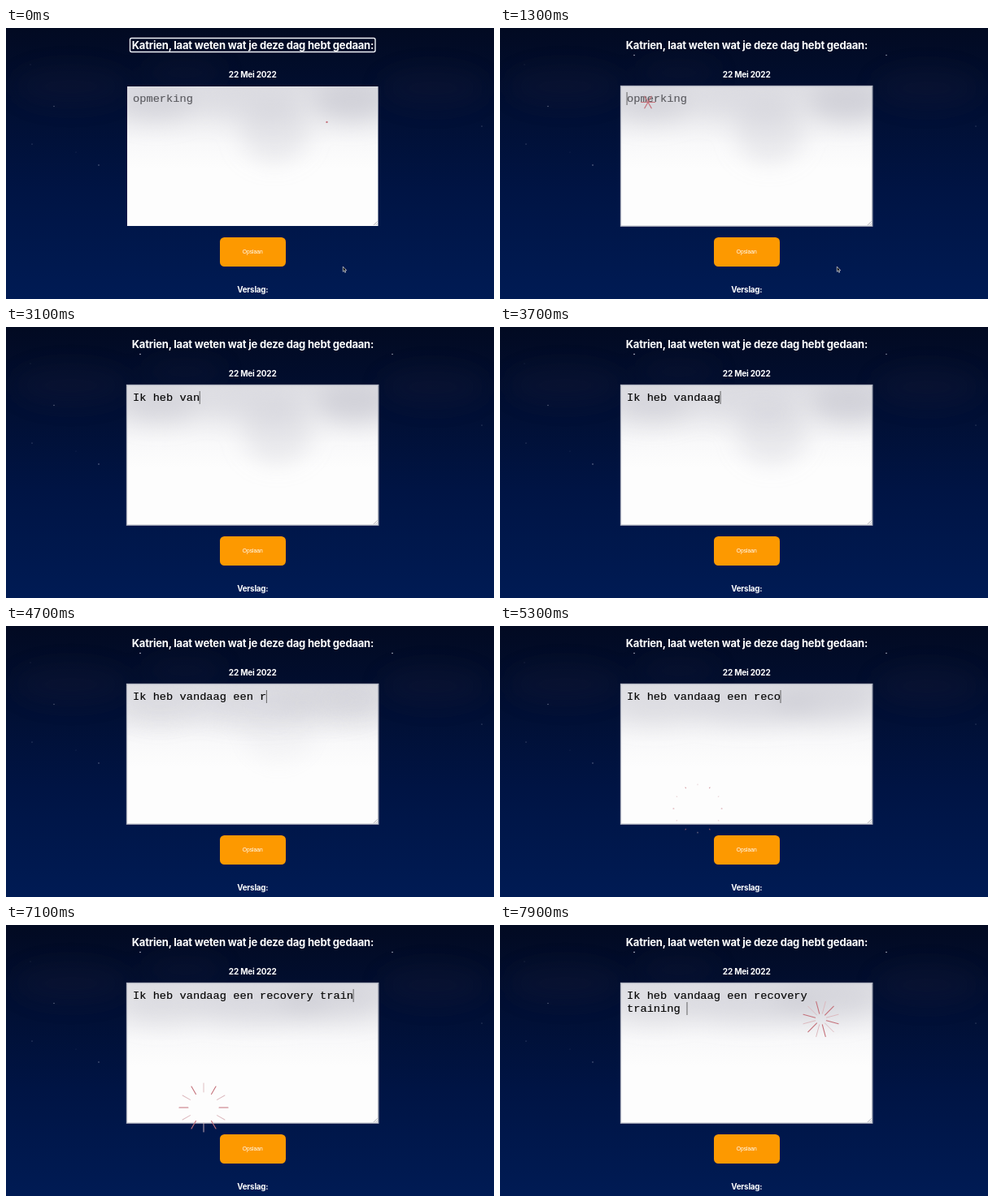
An HTML page that plays this animation: 600 by 334 pixels, repeating every 8000 ms.

```html
<!DOCTYPE html>
<html lang="nl">
<head>
<meta charset="utf-8">
<title>Dagverslag</title>
<style>
  html, body { margin: 0; width: 100%; height: 100%; overflow: hidden; background: #01103a; }
  svg { display: block; width: 100vw; height: 100vh; }
  .ui { font-family: Inter, "Open Sans", sans-serif; font-weight: 700; fill: #fff; text-anchor: middle; letter-spacing: -.2px; }
  .mono { font: 13.69px "Liberation Mono", "Courier New", monospace; white-space: pre; }
  .btn { font: 6.7px "Liberation Sans", Arial, sans-serif; fill: #fff; text-anchor: middle; }
</style>
</head>
<body>
<svg viewBox="0 0 600 334" preserveAspectRatio="none">
  <defs>
    <linearGradient id="night" x2="0" y2="1">
      <stop offset="0" stop-color="#020a22"/>
      <stop offset=".3" stop-color="#010f33"/>
      <stop offset=".6" stop-color="#001444"/>
      <stop offset="1" stop-color="#001b54"/>
    </linearGradient>
    <linearGradient id="paper" x2="0" y2="1">
      <stop offset="0" stop-color="#dfdfe4"/>
      <stop offset=".2" stop-color="#ebebee"/>
      <stop offset=".42" stop-color="#f9f9fa"/>
      <stop offset=".6" stop-color="#fdfdfd"/>
    </linearGradient>
    <filter id="soft" x="-50%" y="-80%" width="200%" height="260%"><feGaussianBlur stdDeviation="14"/></filter>
    <clipPath id="box"><rect x="149" y="72" width="308.5" height="172"/></clipPath>
  </defs>

  <rect width="600" height="334" fill="url(#night)"/>
  <g fill="#20243c" opacity=".2" filter="url(#soft)">
    <ellipse cx="80" cy="72" rx="70" ry="24"/>
    <ellipse cx="525" cy="74" rx="65" ry="24"/>
    <ellipse cx="220" cy="55" rx="50" ry="14"/>
  </g>
  <g id="stars" fill="#e4e8f6"></g>

  <text class="ui" x="303.4" y="26" font-size="13" letter-spacing="-.25">Katrien, laat weten wat je deze dag hebt gedaan:</text>
  <rect id="ring" x="152.5" y="12.5" width="301.5" height="17" rx="2" fill="none" stroke="#eef0f6" stroke-width="1.4"/>
  <text class="ui" x="303.2" y="61" font-size="10">22 Mei 2022</text>

  <rect x="149" y="72" width="308.5" height="172" fill="url(#paper)"/>
  <g clip-path="url(#box)">
    <g id="cloudA" fill="#c6c6cf" filter="url(#soft)">
      <ellipse cx="330" cy="128" rx="42" ry="38" opacity=".34"/>
      <ellipse cx="300" cy="92" rx="70" ry="20" opacity=".3"/>
      <ellipse cx="425" cy="90" rx="48" ry="24" opacity=".65"/>
      <ellipse cx="185" cy="92" rx="50" ry="22" opacity=".55"/>
    </g>
    <g id="cloudB" fill="#c6c6cf" filter="url(#soft)">
      <ellipse cx="400" cy="92" rx="65" ry="24" opacity=".45"/>
      <ellipse cx="310" cy="98" rx="85" ry="22" opacity=".42"/>
      <ellipse cx="190" cy="100" rx="50" ry="20" opacity=".35"/>
    </g>
  </g>
  <path d="M452 243l4.5-4.5M454.5 243l2-2" stroke="#85858e" stroke-width=".6"/>
  <rect id="focus" x="148.5" y="71.5" width="309.3" height="172.7" fill="none" stroke="#b0b3bf" stroke-width="1.3"/>

  <text id="line1" class="mono" x="156" y="91.4" stroke-width=".15"></text>
  <text id="line2" class="mono" x="156" y="107.4" stroke-width=".15"></text>
  <rect id="caret" width=".9" height="16" fill="#555"/>

  <rect x="263" y="258" width="81" height="36" rx="5.5" fill="#fd9900"/>
  <text class="btn" x="303.2" y="278.2">Opslaan</text>
  <text class="ui" x="303.3" y="326" font-size="9.8">Verslag:</text>

  <g id="bursts" stroke-linecap="round"></g>
  <path id="mouse" d="M414.3 294v6.3l1.4-1.3 1 2.4 1-.4-1-2.3h2z" fill="#111" stroke="#fff" stroke-width=".6"/>
</svg>
<script>
const LOOP = 8000, CHAR = 8.215, BURST = 600, REACH = 30;
const NS = 'http://www.w3.org/2000/svg';
const $ = id => document.getElementById(id);
const clamp = (v, a = 0, b = 1) => Math.min(b, Math.max(a, v));
const show = (id, on) => { $(id).style.display = on ? '' : 'none'; };

function add(parent, tag, attrs) {
  const el = document.createElementNS(NS, tag);
  set(el, attrs);
  parent.appendChild(el);
  return el;
}
function set(el, attrs) {
  for (const k in attrs) el.setAttribute(k, attrs[k]);
}

// x, y, radius, opacity, time of first appearance
const stars = [
  [165, 33.5, .8, .95, 600], [475, 33.5, .75, .9, 600], [59, 96.5, .65, .5, 0],
  [32, 143, .6, .5, 0], [114, 169, .65, .65, 0], [585, 121, .6, .5, 0],
  [86, 153, .5, .2, 0], [30, 45, .5, .25, 0]
].map(([x, y, r, alpha, from]) => ({ alpha, from, el: add($('stars'), 'circle', { cx: x, cy: y, r }) }));

// x, y, start, tilt in degrees
const bursts = [
  [394.5, 116, -5, 15], [182, 91.5, 1216, 0], [243, 225, 4736, 0],
  [243, 225, 6692, 0], [394.5, 116, 7678, 15]
].map(([x, y, start, tilt]) => {
  const g = add($('bursts'), 'g', { transform: `translate(${x} ${y}) rotate(${tilt})` });
  const rays = Array.from({ length: 12 }, (_, i) => add(g, 'line', {
    transform: `rotate(${i * 30})`,
    stroke: i % 2 ? '#dcb8bd' : '#c4717a',
    'stroke-width': i % 2 ? .9 : 1.1
  }));
  return { g, start, rays };
});

const text = 'Ik heb vandaag een recovery training ';
const wrapAt = 28;
const keys = [[1700, 0], [2200, 3], [3700, 14], [5300, 23], [7100, 33], [7900, 37]];

function typed(t) {
  let n = 0;
  for (let i = 1; i < keys.length; i++) {
    const [t0, n0] = keys[i - 1], [t1, n1] = keys[i];
    if (t >= t0) n = n0 + (n1 - n0) * clamp((t - t0) / (t1 - t0));
  }
  return Math.round(n);
}

function drawText(t) {
  const n = typed(t), wrapped = n >= 36;
  const color = n ? '#050505' : '#5c5c61';
  $('line1').textContent = n ? text.slice(0, wrapped ? wrapAt : n) : 'opmerking';
  $('line2').textContent = wrapped ? text.slice(wrapAt, n) : '';
  for (const id of ['line1', 'line2']) set($(id), { fill: color, stroke: color });
  const col = wrapped ? n - wrapAt : n;
  set($('caret'), { x: 155.6 + col * CHAR, y: wrapped ? 95 : 79 });
}

function drawBurst({ g, start, rays }, t) {
  const u = (t - start) / BURST;
  const on = u >= 0 && u < 1;
  g.style.display = on ? '' : 'none';
  if (!on) return;
  const outer = REACH * clamp(u / .5);
  const inner = clamp((u - .19) * 38.8, 0, outer - .3);
  g.setAttribute('opacity', clamp((1 - u) / .08));
  rays.forEach((ray, i) => {
    set(ray, { x1: inner, x2: outer });
    ray.style.display = i % 2 && u < .18 ? 'none' : '';
  });
}

function draw(t) {
  const focused = t >= 500;
  show('ring', !focused);
  show('focus', focused);
  show('caret', focused);
  show('mouse', t < 1700);
  drawText(t);

  const shift = clamp((t - 3700) / 1500);
  set($('cloudA'), { opacity: 1 - shift, transform: `translate(${t / 900} ${t / 1200})` });
  set($('cloudB'), { opacity: shift, transform: `translate(${(t - 6000) / 700} 0)` });

  stars.forEach((s, i) => {
    const glow = .88 + .12 * Math.cos(t / LOOP * 2 * Math.PI * (2 + i % 3) + i);
    s.el.setAttribute('opacity', t < s.from ? 0 : s.alpha * glow);
  });
  bursts.forEach(b => drawBurst(b, t));
}

const begin = performance.now();
function tick() {
  draw((performance.now() - begin) % LOOP);
  requestAnimationFrame(tick);
}
tick();
</script>
</body>
</html>
```
